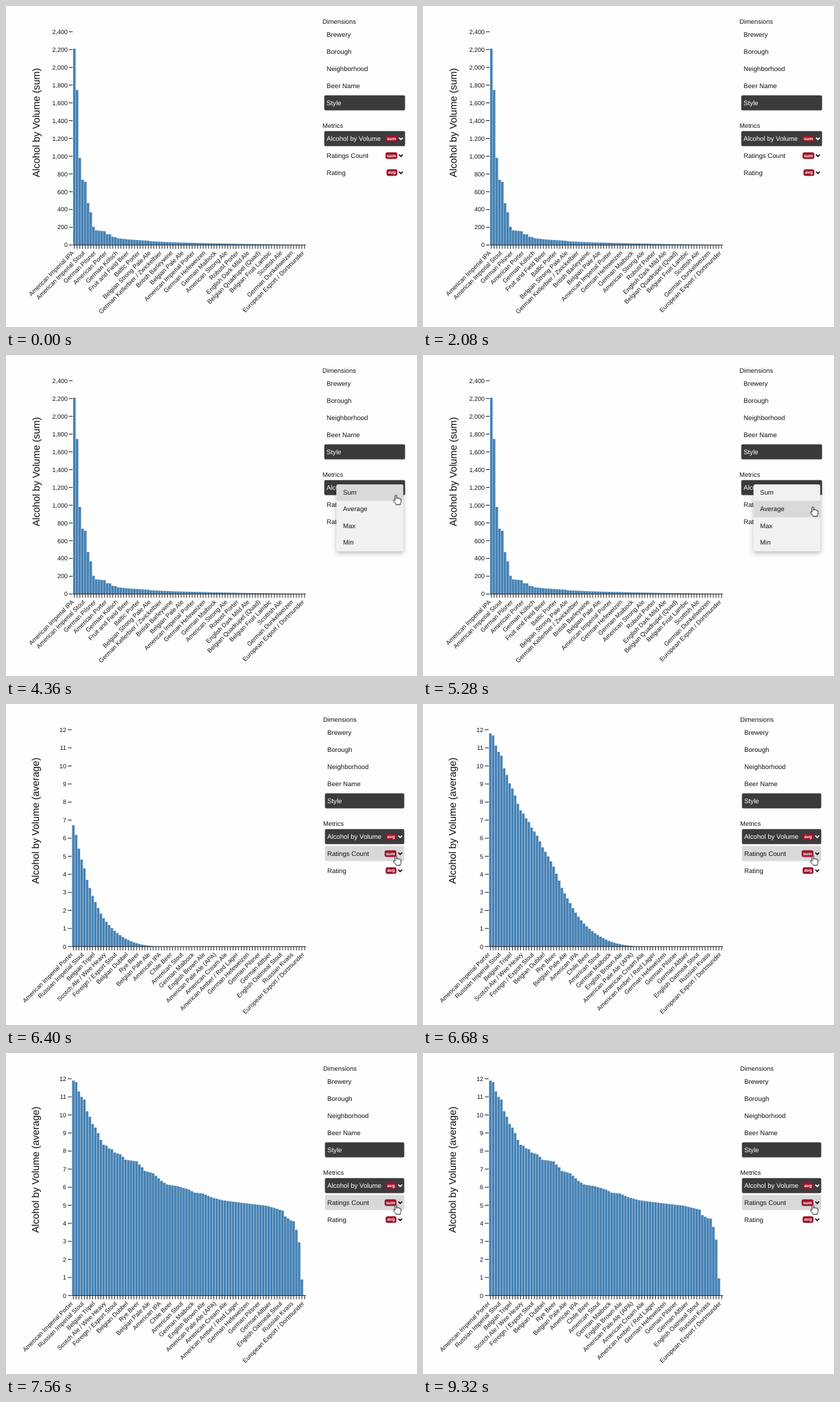
Animation of 600 by 469 pixels, one loop 10000 ms. Source, as an HTML page:

```html
<!DOCTYPE html>
<html lang="en">
<head>
<meta charset="utf-8">
<title>Beer styles chart</title>
<style>
  html, body { margin: 0; width: 100%; height: 100%; overflow: hidden; background: #fefefe; }
  svg {
    display: block; width: 600px; height: 469px; fill: #151517;
    font-family: "Liberation Sans", Arial, sans-serif; text-rendering: geometricPrecision;
  }
  .tick { font-size: 9px; }
  .title { font-size: 14.45px; fill: #0c0c0e; }
  .head { font-size: 9.35px; }
  .row { font-size: 9.65px; }
  .badge { font-size: 6.5px; font-weight: bold; fill: #fff; }
  .axis { stroke: #222; stroke-width: 1; fill: none; }
  .bar { fill: #4682b4; }
  .light { fill: #fff; }
  .chevron { fill: none; stroke: #111; stroke-width: 1.7; }
  .chevron.light { stroke: #fff; fill: none; }
  .cursor path { fill: #fff; stroke: #111; stroke-width: 1; stroke-linejoin: round; }

  #before, #after, #hand, #arrow, #hoverSum, #hoverAvg { animation: 10s step-end infinite both; }
  #before { animation-name: before; }
  #after { animation-name: after; }
  @keyframes before { 0% { visibility: visible } 60%, 100% { visibility: hidden } }
  @keyframes after { 0% { visibility: hidden } 60%, 100% { visibility: visible } }

  /* Cubic in-out, split at its midpoint so that both halves are exact. */
  .grow { animation: grow 10s infinite both; }
  @keyframes grow {
    0% { y: var(--base); height: 0 }
    59.83% { y: var(--base); height: 0; animation-timing-function: cubic-bezier(.3333, 0, .6667, 0) }
    63.83% {
      y: calc(var(--base) - var(--h) / 2); height: calc(var(--h) / 2);
      animation-timing-function: cubic-bezier(.3333, 1, .6667, 1);
    }
    67.83%, 100% { y: calc(var(--base) - var(--h)); height: var(--h) }
  }

  #menu { transform-origin: 575px 196px; animation: menu 10s infinite both; }
  @keyframes menu {
    0% { opacity: 0; transform: scale(.75, .56) }
    34.2% { opacity: 0; transform: scale(.75, .56); animation-timing-function: cubic-bezier(.4, 0, .2, 1) }
    36.8% { opacity: 1; transform: none }
    60% { opacity: 1; transform: none; animation-timing-function: cubic-bezier(.4, 0, .2, 1) }
    62%, 100% { opacity: 0; transform: scale(.75, .56) }
  }
  #hoverSum { animation-name: hoverSum; }
  #hoverAvg { animation-name: hoverAvg; }
  @keyframes hoverSum { 0% { visibility: visible } 44.4%, 100% { visibility: hidden } }
  @keyframes hoverAvg { 0% { visibility: hidden } 44.4%, 100% { visibility: visible } }

  #cursor { animation: move 10s infinite both; }
  @keyframes move {
    0%, 24.8% { transform: translate(612px, 226px); animation-timing-function: ease-out }
    27.2%, 30.4% { transform: translate(570px, 197px); animation-timing-function: ease-in-out }
    32.8%, 41% { transform: translate(569.3px, 193.9px); animation-timing-function: ease-in-out }
    47%, 100% { transform: translate(569.3px, 221.9px) }
  }
  #hand { animation-name: hand; }
  #arrow { animation-name: arrow; }
  @keyframes hand { 0% { visibility: hidden } 26%, 100% { visibility: visible } }
  @keyframes arrow { 0% { visibility: visible } 26%, 100% { visibility: hidden } }
</style>
</head>
<body>
<svg id="stage" viewBox="0 0 600 469"></svg>
<script>
const COUNT = 85;

const views = [
  {
    id: 'before', title: 'Alcohol by Volume (sum)', titleX: 49,
    left: 97.8, pitch: 4, base: 349.2, top: 37.7, max: 2400, step: 200, labelX: 90,
    panel: { x: 464.6, width: 118, text: 468, head: 462, badge: 571.3, chevron: 576.5 },
    kinds: ['sum', 'sum', 'avg'],
    points: [0,2210, 1,1745, 2,980, 3,735, 4,712, 5,472, 6,368, 7,205, 8,165, 11,155, 12,122, 13,120,
      14,92, 15,88, 16,75, 20,62, 27,48, 28,42, 36,30, 52,18, 68,9, 84,1],
    names: ['American Imperial IPA', 'American Imperial Stout', 'German Pilsner', 'American Porter',
      'German Kölsch', 'Fruit and Field Beer', 'Baltic Porter', 'Belgian Strong Pale Ale',
      'German Kellerbier / Zwickelbier', 'British Barleywine', 'Belgian Pale Ale',
      'American Imperial Porter', 'German Hefeweizen', 'German Maibock', 'American Strong Ale',
      'Robust Porter', 'English Dark Mild Ale', 'Belgian Quadrupel (Quad)', 'Belgian Fruit Lambic',
      'Scottish Ale', 'German Dunkelweizen', 'European Export / Dortmunder']
  },
  {
    id: 'after', title: 'Alcohol by Volume (average)', titleX: 47.5, grow: true, hover: 1,
    left: 96.3, pitch: 4.02, base: 354.4, top: 37.7, max: 12, step: 1, labelX: 88,
    panel: { x: 465.6, width: 115.8, text: 469, head: 463, badge: 570, chevron: 575.5 },
    kinds: ['avg', 'sum', 'avg'],
    points: [0,11.9, 1,11.82, 2,11.3, 3,11, 4,10.85, 5,10.2, 6,9.9, 7,9.5, 8,9.3, 9,9, 10,8.62, 11,8.35,
      12,8.3, 13,8.15, 14,8.1, 15,7.92, 17,7.82, 18,7.68, 19,7.52, 23,7.43, 24,7.25, 25,7.1, 26,6.9,
      29,6.77, 32,6.35, 34,6.15, 38,6.05, 42,5.87, 44,5.7, 47,5.65, 50,5.45, 54,5.28, 62,5.12, 70,4.98,
      76,4.76, 77,4.45, 79,4.28, 80,4.26, 81,3.8, 82,3.1, 83,.95, 84,0],
    names: ['American Imperial Porter', 'Russian Imperial Stout', 'Belgian Tripel',
      'Scotch Ale / Wee Heavy', 'Foreign / Export Stout', 'Belgian Dubbel', 'Rye Beer',
      'Belgian Pale Ale', 'American IPA', 'Chile Beer', 'American Stout', 'German Maibock',
      'English Brown Ale', 'American Pale Ale (APA)', 'American Cream Ale',
      'American Amber / Red Lager', 'German Hefeweizen', 'German Pilsner', 'German Altbier',
      'English Oatmeal Stout', 'Russian Kvass', 'European Export / Dortmunder']
  }
];

const dimensions = ['Brewery', 'Borough', 'Neighborhood', 'Beer Name', 'Style'];
const metrics = ['Alcohol by Volume', 'Ratings Count', 'Rating'];
const options = ['Sum', 'Average', 'Max', 'Min'];

const text = (x, y, label, cls, extra = '') =>
  `<text x="${x}" y="${y}" class="${cls}" ${extra}>${label}</text>`;
const rect = (x, y, w, h, fill, r = 0, extra = '') =>
  `<rect x="${x}" y="${y}" width="${w}" height="${h}" rx="${r}" fill="${fill}" ${extra}/>`;

// Linear interpolation through flat [index, value] pairs.
function valueAt(points, i) {
  let k = 0;
  while (k + 4 < points.length && points[k + 2] <= i) k += 2;
  const [i0, v0, i1, v1] = points.slice(k, k + 4);
  return v0 + (v1 - v0) * (i - i0) / (i1 - i0);
}

function chart(v) {
  const scale = (v.base - v.top) / v.max;
  const right = v.left + v.pitch * COUNT;
  let out = '', axis = `M${v.left} ${v.base}H${right}`;
  for (let i = 0; i < COUNT; i++) {
    const x = v.left + i * v.pitch, mid = x + v.pitch / 2;
    const h = valueAt(v.points, i) * scale;
    const motion = v.grow
      ? ` grow" style="--base:${v.base}px;--h:${h}px;animation-delay:${(i * 1000 / COUNT).toFixed(1)}ms` : '';
    out += `<rect class="bar${motion}" x="${x + v.pitch * .05}" y="${v.base - h}" width="${v.pitch * .9}" height="${h}"/>`;
    axis += `M${mid} ${v.base}v5.5`;
    if (i % 4 === 0) {
      out += text(0, 0, v.names[i / 4], 'tick',
        `text-anchor="end" transform="translate(${mid} ${v.base + 12.3}) rotate(-45)"`);
    }
  }
  for (let n = 0; n <= v.max; n += v.step) {
    const y = v.base - n * scale;
    axis += `M${v.left - 6} ${y}h5.5`;
    out += text(v.labelX, y + 3.2, n.toLocaleString('en-US'), 'tick', 'text-anchor="end"');
  }
  return out + `<path class="axis" d="${axis}"/>` +
    text(0, 0, v.title, 'title', `text-anchor="middle" transform="translate(${v.titleX} 170.5) rotate(-90)"`);
}

function panel(v) {
  const p = v.panel;
  const row = (label, y, on, hover) =>
    (on || hover ? rect(p.x, y - 11.1, p.width, 22, on ? '#3b3b3d' : '#d9d8da', 2) : '') +
    text(p.text, y + 3.1, label, on ? 'row light' : 'row');
  let out = text(p.head, 26.2, 'Dimensions', 'head') + text(p.head, 178, 'Metrics', 'head');
  dimensions.forEach((d, i) => out += row(d, 42.1 + i * 24.85, d === 'Style'));
  metrics.forEach((m, i) => {
    const y = 193.8 + i * 24.8, on = i === 0, kind = v.kinds[i];
    const w = kind === 'sum' ? 17.3 : 15.8;
    out += row(m, y, on, v.hover === i) +
      rect(p.badge - w, y - 4.8, w, 9.7, '#9c1529', 3) +
      text(p.badge - w / 2, y + 1.9, kind, 'badge', 'text-anchor="middle"') +
      `<path class="chevron${on ? ' light' : ''}" d="M${p.chevron - 2.8} ${y - 1.4}l2.8 2.7 2.8-2.7"/>`;
  });
  return out;
}

function menu() {
  return `<g id="menu">` +
    rect(482.5, 189, 97.5, 97.5, '#f1f0f2', 3, 'filter="url(#shadow)"') +
    rect(482.5, 189, 97.5, 24, '#d9d8da', 3, 'id="hoverSum"') +
    rect(482.5, 213.2, 97.5, 24, '#d9d8da', 0, 'id="hoverAvg"') +
    options.map((o, i) => text(492, 204.2 + i * 24.2, o, 'row')).join('') + '</g>';
}

const cursor = `<g id="cursor" class="cursor">
  <path id="arrow" d="M0 0V12l2.8-2.6 1.8 4.2 1.9-.8-1.8-4.1H8.5Z"/>
  <path id="hand" d="M-1.3 1.2C-1.3-.4 1.1-.4 1.1 1.2V5l.2-.6C1.6 3.6 3.3 3.8 3.4 5c.3-.9 2-.7 2.1.5
    .4-.7 1.8-.4 1.8.8V9.5c0 1.6-1 2.2-1 4.3H.3C.1 12-2.6 10.3-3.6 8.3-4.2 7-2.5 6.2-1.3 7.8Z"/>
</g>`;

document.getElementById('stage').innerHTML = `
  <filter id="shadow" x="-20%" y="-20%" width="140%" height="150%">
    <feDropShadow dx="0" dy="3" stdDeviation="3.5" flood-opacity=".28"/>
  </filter>` +
  views.map(v => `<g id="${v.id}">${chart(v)}${panel(v)}</g>`).join('') + menu() + cursor;
</script>
</body>
</html>
```
